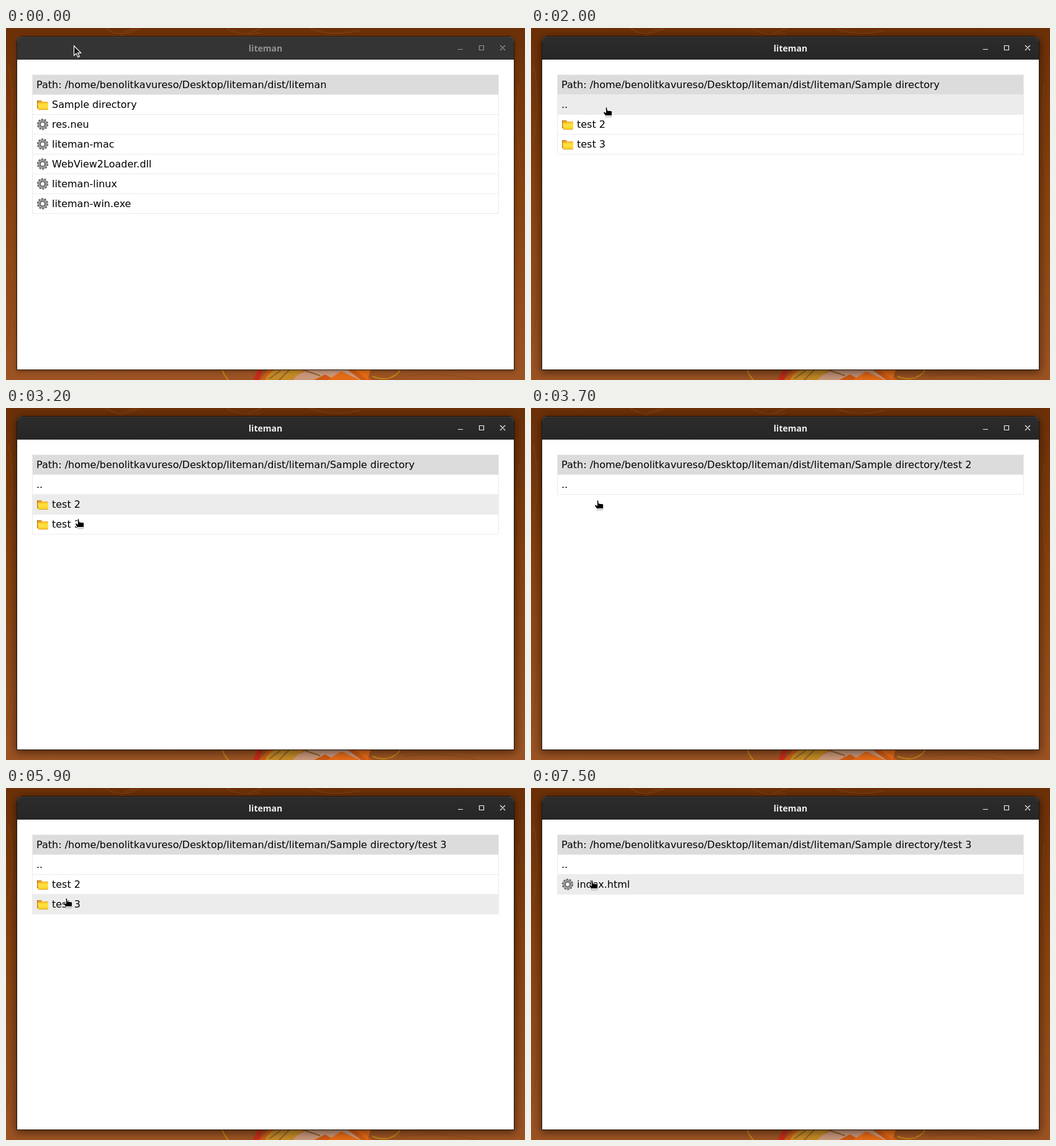
Animation of 836x568 px, one loop 8 s. Source, as an HTML page:

```html
<!DOCTYPE html>
<html lang="en">
<head>
<meta charset="utf-8">
<title>liteman</title>
<style>
  html, body { margin: 0; width: 100%; height: 100%; overflow: hidden; }
  body { position: relative; background: #8c4717; }
  svg { display: block; }
  .wallpaper, .cursor { position: absolute; left: 0; top: 0; }
  .window {
    position: absolute; left: 18px; top: 14px; width: 800px; height: 537px;
    border-radius: 8px 8px 0 0; background: #fff;
    box-shadow: 0 0 0 1px #2a1a0c, 0 2px 7px 1px rgba(0, 0, 0, .32);
  }
  .window.focused { box-shadow: 0 0 0 1px #20140a, 0 3px 14px 2px rgba(0, 0, 0, .5); }
  .bar {
    position: relative; height: 36px; border-bottom: 1px solid #1f1f1f;
    border-radius: 8px 8px 0 0; background: #343434; color: #929292;
    box-shadow: inset 0 1px #404040;
    font: bold 14px/37px "Noto Sans", "Open Sans", sans-serif; text-align: center;
  }
  .focused .bar { background: linear-gradient(#2c2c2c, #262626); color: #f0f0f0; box-shadow: inset 0 1px #3a3a3a; }
  .bar svg { position: absolute; left: 700px; top: 0; fill: none; stroke: currentColor; }
  .list {
    position: absolute; left: 24px; top: 61px; width: 750px;
    border: 1px solid #ececec; border-bottom: 0;
    font: 16px/31px "DejaVu Sans", sans-serif; color: #000;
  }
  .row { position: relative; height: 31px; padding-left: 6px; border-bottom: 1px solid #ececec; white-space: pre; }
  .row:first-child { background: #dcdcdc; }
  .list .hover { background: #ececec; }
  .icon { padding-left: 31px; }
  .row svg { position: absolute; left: 6px; top: 5px; }
</style>
</head>
<body>
<svg class="wallpaper" width="836" height="568">
  <defs>
    <linearGradient id="sky" x2="0" y2="1">
      <stop stop-color="#6c3008"/><stop offset=".45" stop-color="#87410f"/><stop offset="1" stop-color="#9c5323"/>
    </linearGradient>
    <linearGradient id="yellow" x2="0" y2="1">
      <stop stop-color="#fbc72c"/><stop offset=".4" stop-color="#ffe23f"/><stop offset="1" stop-color="#f8d02c"/>
    </linearGradient>
    <symbol id="folder" viewBox="0 0 20 22">
      <path d="M1 4h7l1 2h9v11H1z" fill="#c47c1c"/>
      <path d="M3 5h5l1 1h8v3H3z" fill="#f0a92b"/>
      <path d="M2 8h6l1-1h10v11q0 1-1 1H3z" fill="url(#yellow)"/>
      <path d="M2.5 18.5h16" stroke="#d99f1c"/>
    </symbol>
    <symbol id="gear" viewBox="0 0 20 22">
      <circle cx="10" cy="10.5" r="8" fill="none" stroke="#696969" stroke-width="2.4" stroke-dasharray="3.1 1.927"/>
      <circle cx="10" cy="10.5" r="5.6" fill="none" stroke="#747474" stroke-width="4"/>
      <circle cx="10" cy="10.5" r="5.8" fill="none" stroke="#a9a9a9" stroke-width="1.6"/>
      <circle cx="10" cy="10.5" r="3.5" fill="#fff" stroke="#606060" stroke-width="1.2"/>
    </symbol>
  </defs>
  <rect width="836" height="568" fill="url(#sky)"/>
  <g fill="none" stroke="#8a4815" stroke-width="2" opacity=".45">
    <path d="M160 0q25 18 54 0M185 12q12-14 30-9M355 0q20 14 55 8M390 9l22-9M490 0q30 15 80 4M4 60q12 60 0 120M826 90q-8 90 10 190M6 390q8 60-6 130M640 562q60-8 120 6"/>
  </g>
  <path d="M408 568l14-16h150l18 16z" fill="#cf5a13"/>
  <path d="M398 568l8-18h9l-8 18z" fill="#c92a19"/>
  <path d="M417 568q6-14 22-18h42l-18 18z" fill="#c58a26"/>
  <path d="M462 568q14-18 42-18h44l24 18h-42l-16-9-18 9z" fill="#c9977a"/>
  <path d="M518 568l22-14 30 14zM560 550h28l-6 18z" fill="#e46b16"/>
  <path d="M424 566l18-13M440 568l16-16M482 553l24 8" stroke="#8d6330" stroke-width="2"/>
  <path d="M348 550q2 9 10 18M635 550q-2 9-14 13M590 562q20 8 34 0" fill="none" stroke="#bf8412" stroke-width="2"/>
</svg>

<div class="window">
  <div class="bar">liteman
    <svg width="100" height="36">
      <path d="M10 20.5h8M44.5 14.5h7v7h-7zM78 14l8 8m0-8l-8 8" stroke-width="1.2"/>
    </svg>
  </div>
  <div class="list"></div>
</div>

<svg class="cursor" width="24" height="24" overflow="visible">
  <g class="arrow">
    <path d="M.5.8V16.4L4.2 13l2.7 6 2.4-1.1-2.6-5.8h5z" fill="#111" stroke="#fff" stroke-width="1.2"/>
  </g>
  <g class="hand">
    <path d="M3.6 16.8h9.6l1.6-3" fill="none" stroke="#888" opacity=".7"/>
    <path d="M4 1.6Q5.2 0 6.7 1.6L7.2 6l6 .7q1.5.4 1.5 2v3.5l-1.4 3.6H5L1.2 11Q-.2 8.5 1.8 8l2.8 1.6z" fill="#000" stroke="#fff" stroke-width="1"/>
    <path d="M5 14.5h8" stroke="#fff"/>
  </g>
</svg>

<script>
const DURATION = 8000;
const rootPath = "/home/benolitkavureso/Desktop/liteman/dist/liteman";
const samplePath = rootPath + "/Sample directory";
const folders = {
  root: { path: rootPath, rows: ["Sample directory/", "res.neu", "liteman-mac", "WebView2Loader.dll", "liteman-linux", "liteman-win.exe"] },
  sample: { path: samplePath, rows: ["..", "test 2/", "test 3/"] },
  test2: { path: samplePath + "/test 2", rows: [".."] },
  test3: { path: samplePath + "/test 3", rows: ["..", "index.html"] }
};

// Each step changes only the properties it names; hover 0 is the path row, -1 is none.
const steps = [
  [0, { path: "root", list: "root", hover: -1, focused: false, shape: "arrow", x: 109, y: 28 }],
  [700, { hover: 0, shape: "hand", x: 109, y: 65 }],
  [900, { x: 112, y: 90 }],
  [1000, { hover: 1, x: 115, y: 115 }],
  [1100, { x: 116, y: 127 }],
  [1900, { focused: true }],
  [2000, { path: "sample", list: "sample" }],
  [2800, { hover: 2, x: 114, y: 156 }],
  [2900, { hover: 3, x: 112, y: 172 }],
  [3000, { x: 111, y: 178 }],
  [3200, { hover: 2 }],
  [3400, { x: 102, y: 148 }],
  [3700, { path: "test2", list: "test2", hover: -1 }],
  [3900, { x: 99, y: 144 }],
  [4000, { hover: 1, x: 89, y: 128 }],
  [4100, { x: 83, y: 118 }],
  [4800, { path: "sample", list: "sample" }],
  [5100, { hover: 2, x: 86, y: 140 }],
  [5200, { hover: 3, x: 90, y: 166 }],
  [5300, { x: 92, y: 177 }],
  [5900, { path: "test3" }],
  [6000, { list: "test3", hover: -1 }],
  [6400, { shape: "arrow", x: 97, y: 178 }],
  [6500, { y: 172 }],
  [7400, { hover: 2, shape: "hand", x: 93, y: 156 }],
  [7500, { y: 148 }]
];

const $ = selector => document.querySelector(selector);

function rowHtml(name, index, hover) {
  const isFolder = name.endsWith("/");
  const plain = index === 0 || name === "..";
  const icon = plain ? "" : `<svg width="20" height="22"><use href="#${isFolder ? "folder" : "gear"}"/></svg>`;
  const label = isFolder ? name.slice(0, -1) : name;
  return `<div class="row${plain ? "" : " icon"}${index === hover ? " hover" : ""}">${icon}${label}</div>`;
}

function draw(state) {
  const rows = ["Path: " + folders[state.path].path, ...folders[state.list].rows];
  $(".list").innerHTML = rows.map((name, i) => rowHtml(name, i, state.hover)).join("");
  $(".window").classList.toggle("focused", state.focused);
  $(".cursor").style.transform = `translate(${state.x}px, ${state.y}px)`;
  for (const shape of ["arrow", "hand"]) {
    $("." + shape).style.display = shape === state.shape ? "" : "none";
  }
}

let shown = 0;
function tick() {
  const time = performance.now() % DURATION;
  const count = steps.filter(([start]) => start <= time).length;
  if (count !== shown) {
    shown = count;
    draw(Object.assign({}, ...steps.slice(0, count).map(step => step[1])));
  }
  requestAnimationFrame(tick);
}
tick();
</script>
</body>
</html>
```
